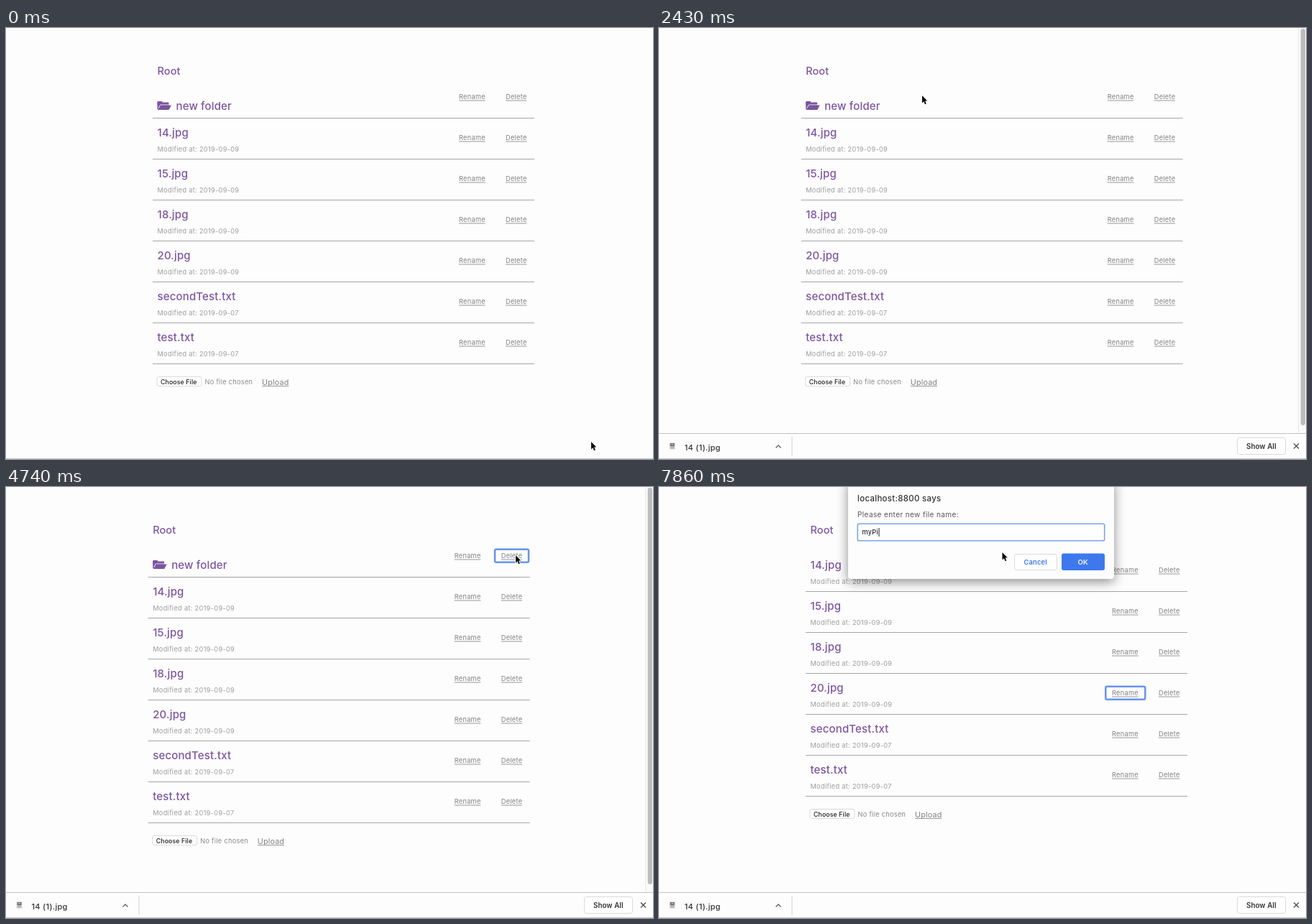
An HTML page with a canvas for the animation above (8 s loop, 900x600 px).

```html
<!DOCTYPE html>
<html lang="en">
<head>
<meta charset="utf-8">
<title>File list</title>
<style>
html, body { margin: 0; width: 100%; height: 100%; overflow: hidden; background: #fdfdfd; }
canvas { display: block; width: 900px; height: 600px; }
</style>
</head>
<body>
<canvas id="stage" width="900" height="600"></canvas>
<script>
const ctx = document.getElementById('stage').getContext('2d');
const LOOP = 8000, STEP = 30;
const PAPER = '#fdfdfd', PURPLE = '#7c55a0', GRAY = '#808083', PALE = '#9d9da0';
const INK = '#333336', EDGE = '#dadadd', BLUE = '#3d79ec';
const FONT = 'Inter, "Open Sans", sans-serif';

// Moments of the story
const SAVE = 1200, OPEN = 2850, BACK = 3930, FOCUS_DEL = 4680, REMOVE = 4770, PROMPT = 5970;

const FILES = [
  ['14.jpg', '2019-09-09'], ['15.jpg', '2019-09-09'], ['18.jpg', '2019-09-09'],
  ['20.jpg', '2019-09-09'], ['secondTest.txt', '2019-09-07'], ['test.txt', '2019-09-07']
];
const TYPED = [[7200, 'm'], [7380, 'my'], [7680, 'myP'], [7860, 'myPi']];

// Pointer stops: time, x, y
const PATH = [
  [0, 814, 576], [630, 241, 147], [840, 241, 147], [960, 241, 146], [1980, 241, 146],
  [2430, 366, 94], [2760, 275, 105], [3150, 275, 105], [3780, 225, 59], [3960, 225, 59],
  [4620, 709, 95], [5160, 709, 95], [5700, 648, 299], [5940, 648, 286],
  [6240, 648, 286], [6540, 477.5, 91], [8000, 477.5, 91]
];
const HAND = [[570, 2070], [2670, 2880], [3690, 4020], [4560, 4680], [5850, 6000]];

const clamp = v => Math.max(0, Math.min(1, v));
const ramp = (t, a, b) => clamp((t - a) / (b - a));
const smooth = p => p * p * (3 - 2 * p);
const within = (t, a, b) => t >= a && t < b;

function text(str, x, y, size, color, weight = 400, gap = 0) {
  ctx.font = `${weight} ${size}px ${FONT}`;
  ctx.letterSpacing = gap + 'px';
  ctx.fillStyle = color;
  ctx.fillText(str, x, y);
  return ctx.measureText(str).width;
}

const title = (str, x, y) => text(str, x, y, 14.6, PURPLE, 500, 0.05);
const entry = (str, x, y) => text(str, x, y, 15, PURPLE, 500, 0.15);

function rect(x, y, w, h, color) {
  ctx.fillStyle = color;
  ctx.fillRect(x, y, w, h);
}

function box(x, y, w, h, r, fill, stroke, width = 1) {
  ctx.beginPath();
  ctx.roundRect(x, y, w, h, r);
  if (fill) { ctx.fillStyle = fill; ctx.fill(); }
  if (stroke) { ctx.strokeStyle = stroke; ctx.lineWidth = width; ctx.stroke(); }
}

function shape(points, fill) {
  ctx.beginPath();
  points.forEach(([x, y]) => ctx.lineTo(x, y));
  ctx.closePath();
  ctx.fillStyle = fill;
  ctx.fill();
}

function line(points, color, width) {
  ctx.beginPath();
  points.forEach(([x, y]) => ctx.lineTo(x, y));
  ctx.strokeStyle = color;
  ctx.lineWidth = width;
  ctx.stroke();
}

function link(str, x, y, size = 9.2, gap = 0.3) {
  const w = text(str, x, y, size, GRAY, 400, gap);
  rect(x, y + 1.5, w - gap, 1, '#98989b');
}

const focusRing = (x, y, w) => box(x, y, w, 18, 2, null, '#6894ea', 2.5);

function folderIcon(x, y) {
  box(x, y, 7, 5, 1, PURPLE);
  box(x, y + 1.5, 16, 10, 1, PURPLE);
  line([[x + 1.5, y + 10], [x + 4.2, y + 5], [x + 19, y + 5]], PAPER, 1);
  shape([[x + 4.5, y + 5.6], [x + 19.5, y + 5.6], [x + 16, y + 12], [x + 1, y + 12]], PURPLE);
}

function rowEnd(y) {
  rect(204, y, 531, 1, '#a6a6a6');
  link('Rename', 630, y - 26);
  link('Delete', 695, y - 26);
}

function page(t) {
  const inFolder = within(t, OPEN, BACK), hasFolder = t < REMOVE;
  ctx.save();
  if (hasScroll(t)) ctx.translate(-6.3, 0);
  title('Root', 210.5, 65);
  if (inFolder) {
    line([[254.5, 57.3], [258, 60.5], [254.5, 63.7]], PURPLE, 1.5);
    title('new folder', 269.5, 65);
  }
  let y = 88;
  if (hasFolder) {
    y = 125;
    folderIcon(210.5, 102);
    entry('new folder', 236.5, 113.5);
    rowEnd(y);
  }
  if (!inFolder) for (const [name, date] of FILES) {
    y += 57;
    entry(name, 210.5, y - 31.5);
    text('Modified at: ' + date, 210.5, y - 10.5, 9.2, PALE, 400, 0.32);
    rowEnd(y);
  }
  box(210, y + 18.5, 62, 13, 2.5, '#ffffff', EDGE);
  text('Choose File', 215, y + 28.5, 8.8, '#222224', 500, 0.1);
  text('No file chosen', 276.5, y + 28.5, 9.2, '#88888b', 400, 0.3);
  link('Upload', 356, y + 29.5, 10.8, 0.15);
  if (within(t, FOCUS_DEL, REMOVE)) focusRing(686.3, 86.7, 47);
  if (t >= PROMPT) focusRing(621.3, 277.7, 55);
  ctx.restore();
}

const hasScroll = t => within(t, SAVE, OPEN) || within(t, BACK, REMOVE);

function scrollbar(t) {
  rect(889, 0, 11, 565, '#fafafa');
  rect(889, 0, 1, 565, '#e9e9eb');
  box(892.7, 1, 6.3, t < 1260 ? 553 : 552, 3, '#bcbcbe');
}

function thumbnail(x, y) {
  box(x - 4.5, y - 5.5, 9, 11, 1, '#ececee');
  rect(x - 3, y - 4, 6, 4.5, '#6c6c70');
  rect(x - 1, y - 3, 2, 1.5, '#d8d8da');
  rect(x - 3, y + 1.5, 6, 2, '#a4a4a6');
}

function shelf(t) {
  const top = t < 1230 ? 583 : t < 1260 ? 565 : 564;
  const split = 36 + 149 * smooth(ramp(t, 1230, 1530));
  ctx.save();
  ctx.translate(0, top - 564);
  rect(0, 564, 900, 36, PAPER);
  rect(0, 564, 900, 1, '#c2c2c4');

  const glow = t < 2370 ? 0.5 + 0.5 * Math.cos(3 * Math.PI * ramp(t, 1230, 2370)) : 0;
  if (glow > 0) {
    ctx.globalAlpha = glow;
    ctx.beginPath();
    ctx.arc(18.5, 582, 10, 0, 2 * Math.PI);
    ctx.fillStyle = '#dde6f4';
    ctx.fill();
    ctx.strokeStyle = BLUE;
    ctx.lineWidth = 2;
    ctx.stroke();
    ctx.globalAlpha = 1;
  }
  thumbnail(18.5, 582);

  ctx.save();
  ctx.beginPath();
  ctx.rect(0, 564, split + 1, 36);
  ctx.clip();
  text('14 (1).jpg', 35.5, 588, 11, INK, 500, 0.3);
  ctx.restore();
  const tip = split - 19;
  if (tip > 100) line([[tip - 3.5, 584.5], [tip, 581], [tip + 3.5, 584.5]], '#66666a', 1.4);
  rect(split - 0.5, 569, 1, 27, '#d0d0d2');

  box(804.5, 570.5, 67, 23, 3, '#ffffff', EDGE);
  text('Show All', 817, 585.5, 9.8, INK, 600, 0.05);
  line([[883, 578.5], [890, 585.5]], '#55555a', 1.5);
  line([[890, 578.5], [883, 585.5]], '#55555a', 1.5);
  ctx.restore();
}

function downloadBadge(t) {
  const p = ramp(t, 1200, 1650);
  if (t < SAVE || p >= 1) return;
  ctx.save();
  ctx.globalAlpha = 1 - smooth(ramp(p, 0.2, 1));
  ctx.translate(25, 532 + 16 * p);
  ctx.shadowColor = 'rgba(0,0,0,.35)';
  ctx.shadowBlur = 9;
  ctx.shadowOffsetY = 1;
  box(-28, -27, 57, 56, 28, '#ffffff');
  ctx.shadowColor = 'transparent';
  shape([[-3.5, -10], [3.5, -10], [3.5, -3], [7.5, -3], [0, 5.5], [-7.5, -3], [-3.5, -3]], '#6598ee');
  rect(-13.5, 15, 27, 3.2, '#6598ee');
  ctx.restore();
}

function prompt(t) {
  ctx.save();
  ctx.globalAlpha = ramp(t, PROMPT - STEP, PROMPT + 90);
  ctx.shadowColor = 'rgba(0,0,0,.45)';
  ctx.shadowBlur = 16;
  ctx.shadowOffsetY = 4;
  box(263, -10, 370, 138, 4, PAPER);
  ctx.shadowColor = 'transparent';
  text('localhost:8800 says', 276, 20, 11.5, INK, 500, 0.28);
  text('Please enter new file name:', 276, 41.5, 10.1, '#58585c', 400, 0.35);
  box(276.3, 51.3, 343.4, 23.4, 2, '#ffffff', '#7ba4e6', 1.6);
  let value = '', since = PROMPT;
  for (const [at, str] of TYPED) if (t >= at) { value = str; since = at; }
  const w = text(value, 282.5, 66, 9.2, '#252528', 500, 0.25);
  if (Math.floor((t - since + 10) / 500) % 2 === 0) rect(283 + w, 57, 1, 12, '#252528');
  box(494.5, 93.5, 59, 22, 3, '#ffffff', EDGE);
  text('Cancel', 507.5, 107.5, 9.4, BLUE, 600, 0.15);
  box(560, 92.5, 60, 23.5, 3, BLUE);
  text('OK', 582.5, 107.5, 9.6, '#f6f8ff', 600, 0.1);
  ctx.restore();
}

function pointerAt(t) {
  const i = PATH.findIndex(stop => stop[0] > t);
  const [t0, x0, y0] = PATH[i - 1], [t1, x1, y1] = PATH[i];
  const p = smooth(ramp(t, t0, t1));
  return [x0 + (x1 - x0) * p, y0 + (y1 - y0) * p];
}

function pointer(t) {
  const [x, y] = pointerAt(t);
  ctx.save();
  ctx.translate(x, y);
  ctx.lineJoin = 'round';
  if (HAND.some(([a, b]) => within(t, a, b))) {
    ctx.beginPath();
    ctx.moveTo(-2.2, 0.8);
    ctx.quadraticCurveTo(-0.8, -1, 0.6, 0.8);
    ctx.lineTo(2, 4.2);
    ctx.quadraticCurveTo(4, 3, 5, 4.2);
    ctx.quadraticCurveTo(7.4, 3.6, 8, 6);
    ctx.quadraticCurveTo(8.6, 9.5, 7.2, 12.5);
    ctx.lineTo(1, 12.8);
    ctx.quadraticCurveTo(-1.8, 10, -3.8, 7.8);
    ctx.quadraticCurveTo(-3, 5.4, -0.6, 7);
    ctx.closePath();
    ctx.fillStyle = '#ffffff';
    ctx.fill();
    ctx.strokeStyle = '#38383a';
    ctx.lineWidth = 1.2;
    ctx.stroke();
    for (const fx of [2, 4, 6]) line([[fx, 7.5], [fx, 10.5]], '#707074', 0.7);
  } else {
    const arrow = [[0, 0], [0, 10.4], [2.4, 8.2], [4, 12.2], [5.8, 11.4], [4.2, 7.6], [7.3, 7.4]];
    line([...arrow, arrow[0]], '#ffffff', 1.8);
    shape(arrow, '#0a0a0a');
  }
  ctx.restore();
}

function draw(t) {
  rect(0, 0, 900, 600, PAPER);
  page(t);
  if (hasScroll(t)) scrollbar(t);
  if (t >= SAVE) shelf(t);
  rect(0, 599, 900, 1, '#c4c4c6');
  downloadBadge(t);
  if (t >= PROMPT) prompt(t);
  pointer(t);
}

const start = performance.now();
function tick() {
  const t = (performance.now() - start) % LOOP;
  draw(Math.floor(t / STEP) * STEP);
  requestAnimationFrame(tick);
}
tick();
</script>
</body>
</html>
```
